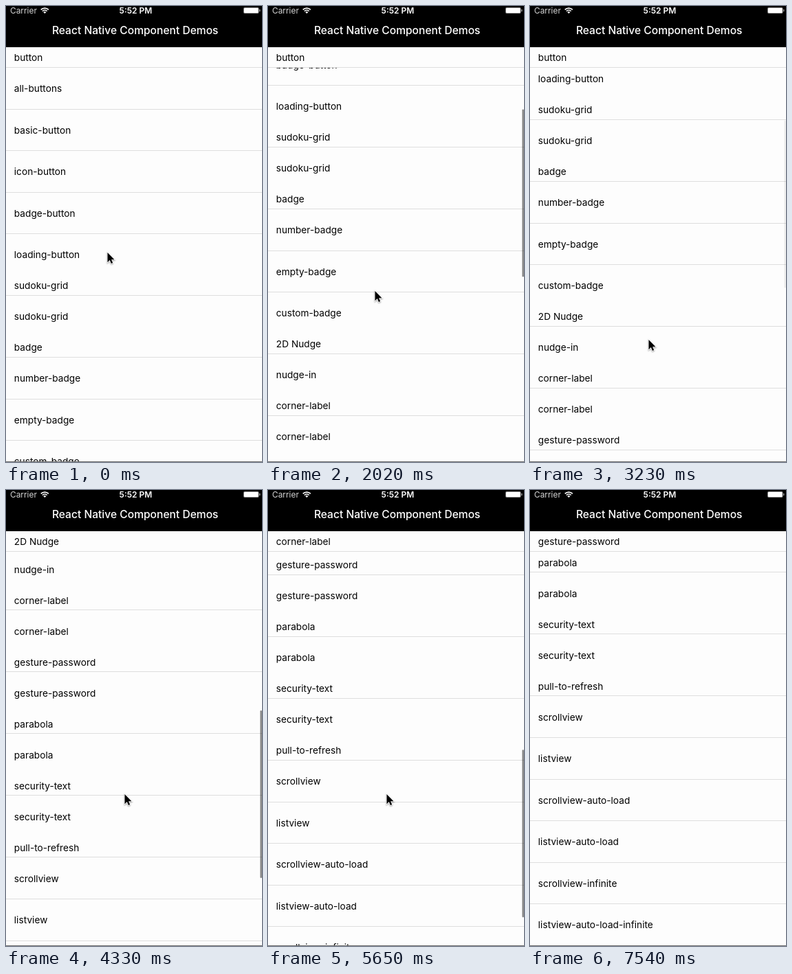
An HTML page with a canvas for the animation above (7930 ms loop, 372 by 664 pixels).

```html
<!DOCTYPE html>
<html lang="en">
<head>
<meta charset="utf-8">
<title>Component list</title>
<style>
  html, body { margin: 0; width: 100%; height: 100%; overflow: hidden; background: #000; }
  canvas { display: block; }
</style>
</head>
<body>
<canvas id="stage" width="372" height="664"></canvas>
<script>
const ctx = document.getElementById('stage').getContext('2d');
const WIDTH = 372, BOTTOM = 663, NAV = 60, LOOP = 7930;
const HEADER = 30, ROW = 60, HAIRLINE = 0.5;
const PAPER = '#fdfdfd', RULE = '#dedede';

const sections = [
  ['button', 'all-buttons', 'basic-button', 'icon-button', 'badge-button', 'loading-button'],
  ['sudoku-grid', 'sudoku-grid'],
  ['badge', 'number-badge', 'empty-badge', 'custom-badge'],
  ['2D Nudge', 'nudge-in'],
  ['corner-label', 'corner-label'],
  ['gesture-password', 'gesture-password'],
  ['parabola', 'parabola'],
  ['security-text', 'security-text'],
  ['pull-to-refresh', 'scrollview', 'listview', 'scrollview-auto-load',
    'listview-auto-load', 'scrollview-infinite', 'listview-auto-load-infinite'],
].map(([title, ...rows]) => ({ title, rows }));

let contentEnd = NAV;
for (const section of sections) {
  section.top = contentEnd;
  contentEnd += HEADER + section.rows.length * (ROW + HAIRLINE) - HAIRLINE;
}
const MAX_SCROLL = contentEnd - BOTTOM;

const clamp01 = v => Math.min(1, Math.max(0, v));
const ramp = (t, from, to) => clamp01((t - from) / (to - from));
const lerp = (a, b, u) => a + (b - a) * u;

// Inertial scrolling: the distance left decays with a 500 ms time constant.
const fling = (t, start, rest, left) => rest - left * Math.exp((start - t) / 500);

function scrollAt(t) {
  if (t < 1272) return 48 * ramp(t, 1140, 1272);
  if (t < 3640) return Math.min(256, fling(t, 1272, 264.5, 216.5));
  if (t < 3747) return lerp(256, 299, ramp(t, 3640, 3747));
  const coasting = fling(Math.min(t, 6020), 3747, 790, 491);
  if (t < 6304) return lerp(coasting, MAX_SCROLL, ramp(t, 6110, 6304));
  const dt = t - 6304; // critically damped bounce past the end
  return MAX_SCROLL + 0.45 * dt * Math.exp(-dt / 55);
}

// Pointer moves: [start, end, x, y]
const moves = [
  [50, 110, 150, 401],
  [540, 760, 156, 463],
  [1140, 1272, 156, 415],
  [2300, 2600, 173, 486],
  [3640, 3747, 173, 443],
  [6110, 6304, 172.5, 355],
];

function pointerAt(t) {
  let x = 148, y = 359;
  for (const [start, end, toX, toY] of moves) {
    const u = ramp(t, start, end);
    x = lerp(x, toX, u);
    y = lerp(y, toY, u);
  }
  const leave = ramp(t, 6980, 7530);
  return [x + 145 * leave * leave, y + 312 * leave];
}

function barAlpha(t) {
  if (t < 1140 || t >= 6720) return 0;
  if (t >= 3140 && t < 3640) return t < 3170 ? 1 : t < 3230 ? 0.5 : 0.15;
  return 1 - ramp(t, 6600, 6720);
}

function box(color, x, y, w, h) {
  ctx.fillStyle = color;
  ctx.fillRect(x, y, w, h);
}

function roundBox(color, x, y, w, h, radius) {
  ctx.fillStyle = color;
  ctx.beginPath();
  ctx.roundRect(x, y, w, h, radius);
  ctx.fill();
}

function text(string, x, y, size, color, weight = 400, align = 'left') {
  ctx.font = `${weight} ${size}px Inter, sans-serif`;
  ctx.textAlign = align;
  ctx.fillStyle = color;
  ctx.fillText(string, x, y);
}

const label = (string, middle) => text(string, 11.8, middle + 5, 13.7, '#000');
const rule = y => box(RULE, 0, Math.floor(y), WIDTH, 1);

function drawList(scroll) {
  box(PAPER, 0, NAV, WIDTH, BOTTOM - NAV);
  for (const { top, rows } of sections) {
    rows.forEach((name, i) => {
      const y = top + HEADER + i * (ROW + HAIRLINE) - scroll;
      if (y > BOTTOM || y < NAV - ROW) return;
      label(name, y + ROW / 2);
      if (i < rows.length - 1) rule(y + ROW);
    });
  }
  rule(contentEnd - scroll);

  // Section headers stick below the bar until the next one pushes them out.
  sections.forEach(({ title, top }, i) => {
    const next = i + 1 < sections.length ? sections[i + 1].top : Infinity;
    const y = Math.min(Math.max(NAV, top - scroll), next - scroll - HEADER);
    if (y > BOTTOM || y <= NAV - HEADER) return;
    box(PAPER, 0, y, WIDTH, HEADER);
    label(title, y + HEADER / 2);
    rule(y + HEADER - 1);
  });
}

function drawScrollBar(scroll, alpha) {
  if (!alpha) return;
  const track = BOTTOM - NAV - 6;
  const length = track * (BOTTOM - NAV) / (contentEnd - NAV);
  const overscroll = Math.max(0, scroll - MAX_SCROLL);
  const top = NAV + 3 + (track - length) * Math.min(1, scroll / MAX_SCROLL);
  roundBox(`rgba(0, 0, 0, ${0.45 * alpha})`, 369.3, top + overscroll, 2.7, length - overscroll, 1.2);
}

function drawWifi(x, y) {
  ctx.strokeStyle = ctx.fillStyle = '#fff';
  ctx.lineWidth = 1.6;
  for (const radius of [4.9, 7.9]) {
    ctx.beginPath();
    ctx.arc(x, y, radius, -Math.PI * 0.75, -Math.PI * 0.25);
    ctx.stroke();
  }
  ctx.beginPath();
  ctx.moveTo(x, y);
  ctx.arc(x, y, 2.9, -Math.PI * 0.75, -Math.PI * 0.25);
  ctx.fill();
}

function drawBattery() {
  roundBox('#8c8c8c', 345, 2, 22.5, 9, 2);
  roundBox('#fff', 346, 3, 20.5, 7, 1);
  roundBox('#8c8c8c', 368, 4.8, 1.5, 3.4, 0.7);
}

function drawNav() {
  box('#000', 0, 0, WIDTH, NAV);
  text('Carrier', 6, 10.5, 11.9, '#d4d4d4');
  drawWifi(56.3, 11);
  text('5:52 PM', 188.5, 10.5, 12, '#fff', 600, 'center');
  drawBattery();
  text('React Native Component Demos', 187.7, 41, 15.6, '#fff', 500, 'center');
}

const arrow = new Path2D('M0 0V14.2L3.3 11.1L5.4 16L7.7 15L5.6 10.2H10Z');

function drawPointer([x, y]) {
  ctx.save();
  ctx.translate(x - 0.5, y);
  ctx.shadowColor = 'rgba(0, 0, 0, 0.4)';
  ctx.shadowBlur = 2;
  ctx.shadowOffsetY = 1;
  ctx.lineWidth = 1.6;
  ctx.strokeStyle = '#fff';
  ctx.stroke(arrow);
  ctx.shadowColor = 'transparent';
  ctx.fillStyle = '#000';
  ctx.fill(arrow);
  ctx.restore();
}

function draw() {
  const t = performance.now() % LOOP;
  const scroll = Math.round(scrollAt(t) * 2) / 2;
  drawList(scroll);
  drawScrollBar(scroll, barAlpha(t));
  drawNav();
  drawPointer(pointerAt(t));
  box('#6e6e6e', 0, BOTTOM, WIDTH, 1);
  requestAnimationFrame(draw);
}
draw();
</script>
</body>
</html>
```
